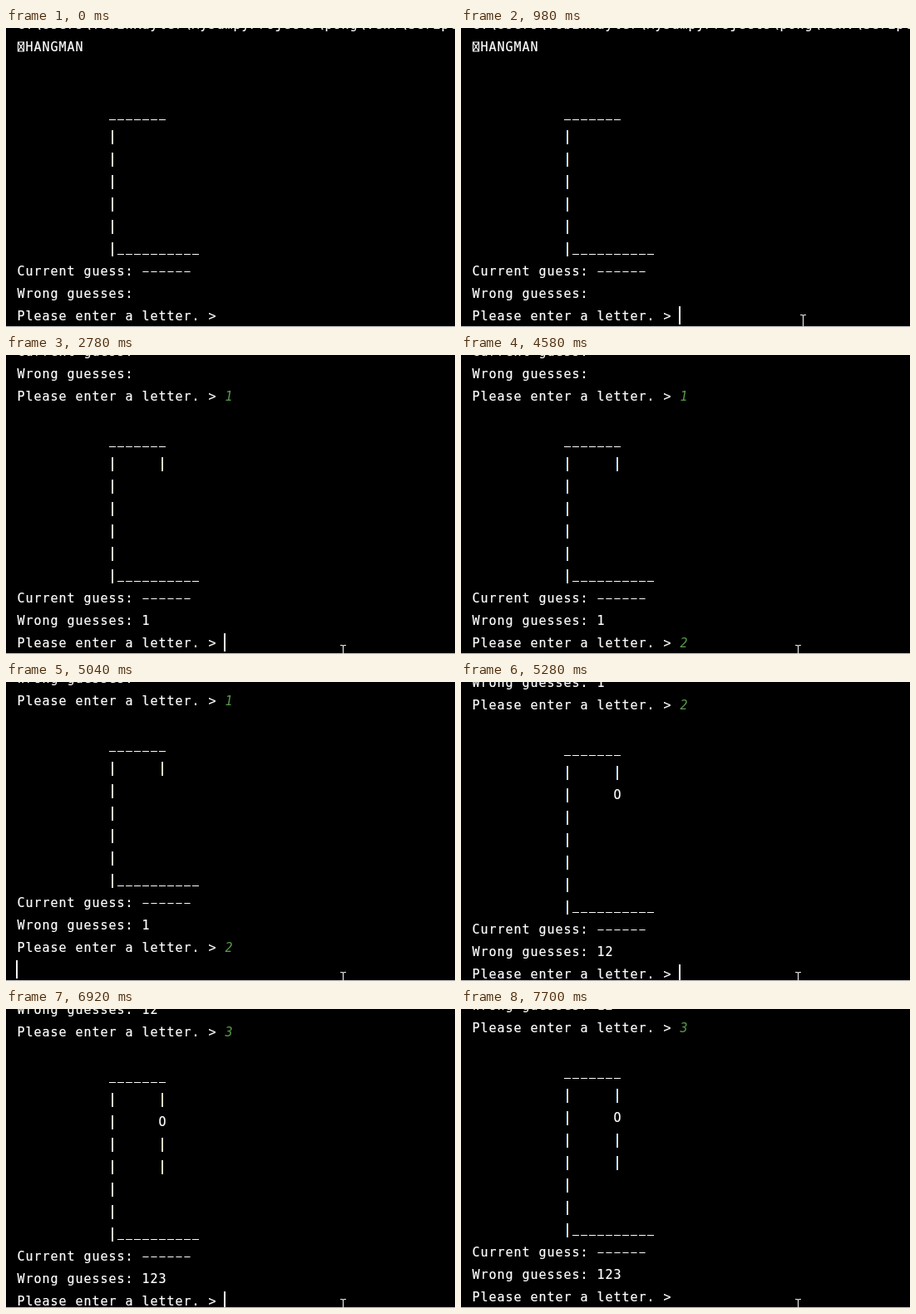
Write an HTML page that moves like this. It is 540 px wide and 360 px high and loops after 8 s.

```html
<!DOCTYPE html>
<html lang="en">
<head>
<meta charset="utf-8">
<title>Hangman console</title>
<style>
  html, body { margin: 0; width: 100%; height: 100%; overflow: hidden; background: #000; }
  svg { display: block; width: 540px; height: 360px; }
  text {
    font: 15px "DejaVu Sans Mono", "Noto Sans Mono", monospace;
    letter-spacing: .97px;
    white-space: pre;
    fill: #fff;
    stroke: #fff;
    stroke-width: .2;
  }
  .input { font-style: italic; fill: #589a4a; stroke: none; }
  .cool { stroke: #b8dcff; }
  .warm { stroke: #ffdca8; }
  .dash { stroke: #fff; }
  .box { fill: none; stroke: #fff; stroke-width: 1.2; }
</style>
</head>
<body>
<svg viewBox="0 0 540 360">
  <rect width="540" height="360" fill="#000"/>
  <g id="page"></g>
  <rect id="caret" width="2" height="22" fill="#fff"/>
  <rect y="359" width="540" height="1" fill="#c8c8c8"/>
  <path id="beam" d="M-3.5 .5H-1L0 1.5L1 .5H3.5M0 1.5V14" fill="none" stroke="#e4e4e4" stroke-width="1.2"/>
</svg>
<script>
const LOOP = 8000, LEFT = 13, CELL = 10, PITCH = 27, BASE = 352;
const PROMPT = "Please enter a letter. > ";
const ROUNDS = [
  { key: "1", type: 2080, enter: 2540, print: 2700 },
  { key: "2", type: 4100, enter: 5040, print: 5200 },
  { key: "3", type: 6060, enter: 6680, print: 6920 }
];
const BODY = ["", "|", "|O", "|O||"];
// [time, value] steps
const SCROLL = [[0, 0], [2700, 27], [2780, 0], [5200, 27], [5280, 5], [5360, 0], [6920, 5], [7000, 0]];
const BLINK = [[0, 0], [980, 1], [1540, 0], [2000, 1], [3560, 0], [4100, 1], [4580, 0], [5040, 1], [7700, 0]];
const MOUSE = [[0, null], [520, [409.5, 354]], [600, [408, 351]], [680, [406.5, 350]],
  [840, [405.5, 349]], [980, [411.5, 345]], [1140, [405.5, 349]]];

const $ = id => document.getElementById(id);
const stepAt = (steps, t) => steps.filter(s => s[0] <= t).pop()[1];

function add(parent, tag, attrs, text) {
  const el = document.createElementNS("http://www.w3.org/2000/svg", tag);
  for (const k in attrs) el.setAttribute(k, attrs[k]);
  if (text) el.textContent = text;
  parent.appendChild(el);
}

// The board printed after a number of wrong guesses
function board(wrong) {
  const pad = " ".repeat(11), rows = [pad + "_".repeat(7)];
  const height = wrong < 2 ? 5 : 6;
  for (let i = 0; i < height; i++) rows.push(pad + "|     " + (BODY[wrong][i] || ""));
  rows.push(pad + "|" + "_".repeat(10), "Current guess: ------",
    "Wrong guesses: " + "123".slice(0, wrong), PROMPT);
  return rows.map(text => ({ text, input: "" }));
}

function linesAt(t) {
  const plain = text => ({ text, input: "" });
  const lines = [
    plain(String.raw`C:\Users\TobinKayler\MyJumpyProjects\pong\venv\Scripts`),
    plain("\u25a1HANGMAN"), plain(""), plain(""), ...board(0)
  ];
  ROUNDS.forEach((r, i) => {
    if (t >= r.type) lines[lines.length - 1].input = r.key;
    if (t >= r.enter) lines.push(plain(""));
    if (t >= r.print) lines.push(...board(i + 1));
  });
  return lines;
}

function drawLine(page, { text, input }, y) {
  const paths = { cool: "", warm: "", dash: "", box: "" };
  [...text].forEach((c, i) => {
    const x = LEFT + i * CELL;
    if (c === "|") {
      // each bar has a cool left edge and a warm right edge
      paths.cool += `M${x + 4.5} ${y - 13}v17`;
      paths.warm += `M${x + 5.5} ${y - 13}v17`;
    }
    if (c === "_") paths.dash += `M${x + 1} ${y + 1.5}h8`;
    if (c === "-") paths.dash += `M${x + 1.4} ${y - 4.5}h7.2`;
    if (c === "\u25a1") paths.box = `M${x + 1.5} ${y - 11}h7v11h-7zl7 11m0 -11l-7 11`;
  });
  const words = text.replace(/[|_\-\u25a1]/g, " ");
  if (words.trim()) add(page, "text", { x: LEFT + .5, y }, words);
  for (const name in paths) {
    if (paths[name]) add(page, "path", { d: paths[name], class: name });
  }
  if (input) add(page, "text", { x: LEFT + .5 + text.length * CELL, y, class: "input" }, input);
}

let shown = "";

function draw(t) {
  const lines = linesAt(t), last = lines[lines.length - 1];
  const bottom = BASE + stepAt(SCROLL, t);
  const state = [lines.length, last.input, bottom].join();
  if (state !== shown) {
    shown = state;
    const page = $("page");
    page.textContent = "";
    lines.forEach((line, i) => {
      const y = bottom - (lines.length - 1 - i) * PITCH;
      if (y > -8) drawLine(page, line, y);
    });
  }
  const caret = $("caret");
  caret.setAttribute("x", LEFT - 1 + (last.text + last.input).length * CELL);
  caret.setAttribute("y", bottom - 17);
  caret.setAttribute("visibility", stepAt(BLINK, t) ? "visible" : "hidden");

  const beam = $("beam"), spot = stepAt(MOUSE, t);
  beam.setAttribute("visibility", spot ? "visible" : "hidden");
  if (spot) beam.setAttribute("transform", `translate(${spot})`);
}

const start = performance.now();
function tick() {
  draw((performance.now() - start) % LOOP);
  requestAnimationFrame(tick);
}
tick();
</script>
</body>
</html>
```
